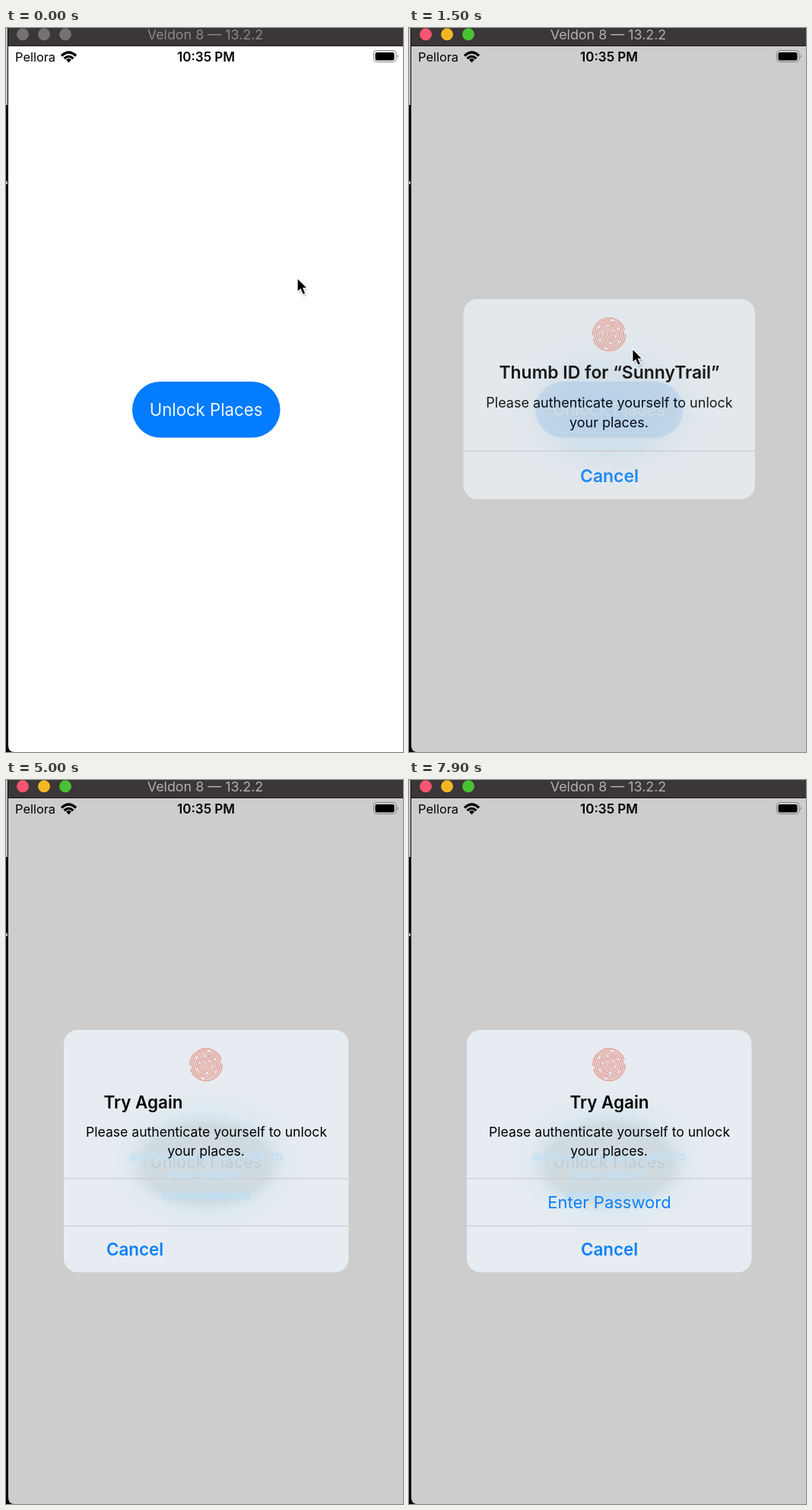
Animation of 522 by 950 pixels, one loop 8000 ms. Source, as an HTML page:

```html
<!DOCTYPE html>
<html lang="en">
<head>
<meta charset="utf-8">
<title>Unlock prompt</title>
<style>
  html, body { margin: 0; width: 100%; height: 100%; overflow: hidden; background: #080305; }
  svg { display: block; width: 522px; height: 950px; font-family: Inter, Roboto, sans-serif; }
  .mid { text-anchor: middle; }
  .bold { font-weight: 600; }
  .action { font-size: 22px; fill: #0a80f8; }
  .action.bold { font-size: 22.4px; }
  .heading { font-size: 22.4px; font-weight: 600; }
  .body { font-size: 17.6px; }
</style>
</head>
<body>
<svg viewBox="0 0 522 950">
  <defs>
    <radialGradient id="halo">
      <stop offset="0" stop-color="#d3e6f4"/>
      <stop offset=".55" stop-color="#d9e7f1" stop-opacity=".8"/>
      <stop offset="1" stop-color="#e6ecf1" stop-opacity="0"/>
    </radialGradient>
    <radialGradient id="smudge">
      <stop offset="0" stop-color="#cfdae0"/>
      <stop offset=".75" stop-color="#d0dbe0"/>
      <stop offset="1" stop-color="#d9e4ea" stop-opacity="0"/>
    </radialGradient>
    <clipPath id="smudgeClip"><ellipse cx="263" cy="503" rx="104" ry="64"/></clipPath>
    <filter id="soft" x="-50%" y="-50%" width="200%" height="200%"><feGaussianBlur stdDeviation="1.5"/></filter>
  </defs>

  <!-- desktop edge -->
  <rect width="522" height="950" fill="#080305"/>
  <rect width="2" height="101" fill="#c3c0c2"/>
  <rect y="201" width="2" height="4" fill="#b8b4b6"/>

  <!-- window -->
  <path d="M3 23H522V950H11Q3 950 3 941Z" fill="#fff"/>
  <rect x="3" width="519" height="23" fill="#3b3637"/>
  <rect x="3" y="23" width="519" height="1" fill="#1c1819"/>
  <g id="lights"></g>
  <text id="windowTitle" class="mid" x="262" y="15" font-size="17.9">Veldon 8 — 13.2.2</text>

  <!-- unlock button -->
  <rect x="166" y="464" width="194.5" height="73.5" rx="36.75" fill="#037cff"/>
  <text id="unlock" class="mid" x="263" y="509" font-size="22.2" fill="#f2f8ff">Unlock Places</text>

  <path id="dim" d="M3 24H522V950H11Q3 950 3 941Z"/>

  <!-- status bar -->
  <text x="12" y="44" font-size="16.4">Pellora</text>
  <text class="mid bold" x="263" y="44" font-size="17">10:35 PM</text>
  <g fill="none" stroke="#000" stroke-width="3.2">
    <path d="M73 36.5Q82.5 27.5 92 36.5"/>
    <path d="M76.6 40.2Q82.5 34.6 88.4 40.2"/>
    <path d="M79 41.5Q82.5 38.5 86 41.5L82.5 45.5Z" fill="#000" stroke="none"/>
  </g>
  <rect x="483.5" y="29.5" width="29.5" height="15" rx="4" fill="none" stroke="#858585"/>
  <rect x="485.5" y="32" width="25" height="10.5" rx="2.2"/>
  <path d="M514.5 35Q517.3 37.2 514.5 39.5Z" fill="#858585"/>

  <!-- authentication alert -->
  <g id="alert">
    <rect id="panel" x="76" width="374.5" rx="18" fill="#e6ecf1"/>
    <ellipse cx="263" cy="500" rx="150" ry="112" fill="url(#halo)"/>
    <g id="backdrop">
      <ellipse cx="263" cy="503" rx="108" ry="68" fill="url(#smudge)"/>
      <g class="mid" clip-path="url(#smudgeClip)">
        <text x="263" y="509" font-size="22" fill="#b5c5cf" opacity=".7">Unlock Places</text>
        <g id="echo" class="bold" font-size="17.6" fill="#c1e1f7">
          <text x="263" y="500">authenticate yourself to</text>
          <text x="263" y="524">your places.</text>
        </g>
        <path d="M205 546H321" stroke="#c1e0f6" stroke-width="9" opacity=".7"/>
      </g>
    </g>
    <g id="top">
      <g id="print" fill="none" stroke="#e69a90" stroke-width="1.4"></g>
      <text id="heading" class="mid heading" y="461"></text>
      <text class="mid body" x="263.5" y="498">Please authenticate yourself to unlock</text>
      <text class="mid body" x="263" y="523.5">your places.</text>
      <path d="M76 553.5H450.5" stroke="#c3c8c9"/>
    </g>
    <g id="retry">
      <text id="password" class="mid action" x="263.5" y="562">Enter Password</text>
      <path d="M76 585H450.5" stroke="#c3c8c9"/>
    </g>
    <text id="cancel" class="mid action bold">Cancel</text>
  </g>

  <g id="cursor">
    <path d="M1 3V20L5 16L8 24L12 22L9 15H14Z" opacity=".35" filter="url(#soft)"/>
    <path d="M0 0V18.5L4.2 14.8L7.3 22L11 20.4L8 13.5H13.5Z" stroke="#fff" stroke-width="1.3"/>
  </g>
</svg>
<script>
const LOOP = 8000, STEP = 100;
const ACTIVE_AT = 700, PRESS_AT = 1100, ALERT_AT = 1300, RETRY_AT = 5000;
const CENTER = { x: 263.25, y: 487 };
const NS = "http://www.w3.org/2000/svg";
const $ = id => document.getElementById(id);

function add(parent, tag, attrs) {
  const node = document.createElementNS(NS, tag);
  set(node, attrs);
  parent.appendChild(node);
  return node;
}
function set(node, attrs) {
  for (const name in attrs) node.setAttribute(name, attrs[name]);
}
const clamp = v => Math.max(0, Math.min(1, v));
const progress = (t, from, to) => clamp((t - from) / (to - from));
const smooth = p => p * p * (3 - 2 * p);
const mix = (a, b, p) => a + (b - a) * p;

const lightColors = ["#fa5472", "#f2b724", "#47c232"];
const lights = lightColors.map((_, i) =>
  add($("lights"), "circle", { cx: 22 + 28 * i, cy: 8.3, r: 8 }));

// Fingerprint: concentric ridges, each broken at a different angle.
for (let i = 0; i < 9; i++) {
  const r = 1.4 + i * 2.45, length = 2 * Math.PI * r;
  add($("print"), "circle", {
    cx: 263, cy: 404, r,
    "stroke-dasharray": `${length * 0.46} ${length * 0.04}`,
    transform: `rotate(${i * 67} 263 404)`
  });
}

function drawWindow(t) {
  const active = t >= ACTIVE_AT;
  lights.forEach((light, i) => set(light, { fill: active ? lightColors[i] : "#757172" }));
  set($("windowTitle"), { fill: active ? "#b3afb0" : "#8b8788" });
  const pressed = progress(t, PRESS_AT, ALERT_AT) - progress(t, ALERT_AT, ALERT_AT + 200);
  set($("unlock"), { opacity: mix(1, 0.36, pressed) });
}

function drawCursor(t) {
  const reach = smooth(progress(t, 0, 800));
  const leave = smooth(progress(t, 1400, 1800));
  const x = mix(mix(383, 287, reach), 330, leave);
  const y = mix(mix(328, 506, reach), -40, leave);
  set($("cursor"), { transform: `translate(${x} ${y})` });
}

function drawAlert(t) {
  const rest = t < ALERT_AT ? 1 : t > 1800 ? 0 : Math.exp((ALERT_AT - t) / 94);
  const shown = 1 - rest, scale = 1 + 0.2 * rest;
  set($("dim"), { opacity: 0.198 * Math.min(1, shown * 1.15) });
  set($("alert"), {
    opacity: shown,
    transform: `translate(${CENTER.x} ${CENTER.y}) scale(${scale}) translate(${-CENTER.x} ${-CENTER.y})`
  });
  set($("backdrop"), { opacity: progress(t, ALERT_AT + 100, 1700) });

  const retry = t >= RETRY_AT;
  const slide = retry ? (1 - progress(t, RETRY_AT, RETRY_AT + 300)) ** 2 : 0;
  const height = retry ? 318 : 256.5;
  const visibility = retry ? "visible" : "hidden";
  set($("panel"), { y: CENTER.y - height / 2, height });
  set($("top"), { transform: `translate(0 ${retry ? -30.5 : 0})` });
  set($("heading"), { x: 263.5 - 83 * slide });
  $("heading").textContent = retry ? "Try Again" : "Thumb ID for “SunnyTrail”";
  set($("retry"), { visibility });
  set($("echo"), { visibility });
  set($("password"), { opacity: 1 - slide });
  set($("cancel"), { x: 263.5 - 94 * slide, y: retry ? 624 : 593 });
}

function draw(now) {
  const t = Math.floor((now % LOOP) / STEP) * STEP;
  drawWindow(t);
  drawCursor(t);
  drawAlert(t);
}

const start = performance.now();
function tick() {
  draw(performance.now() - start);
  requestAnimationFrame(tick);
}
tick();
</script>
</body>
</html>
```
